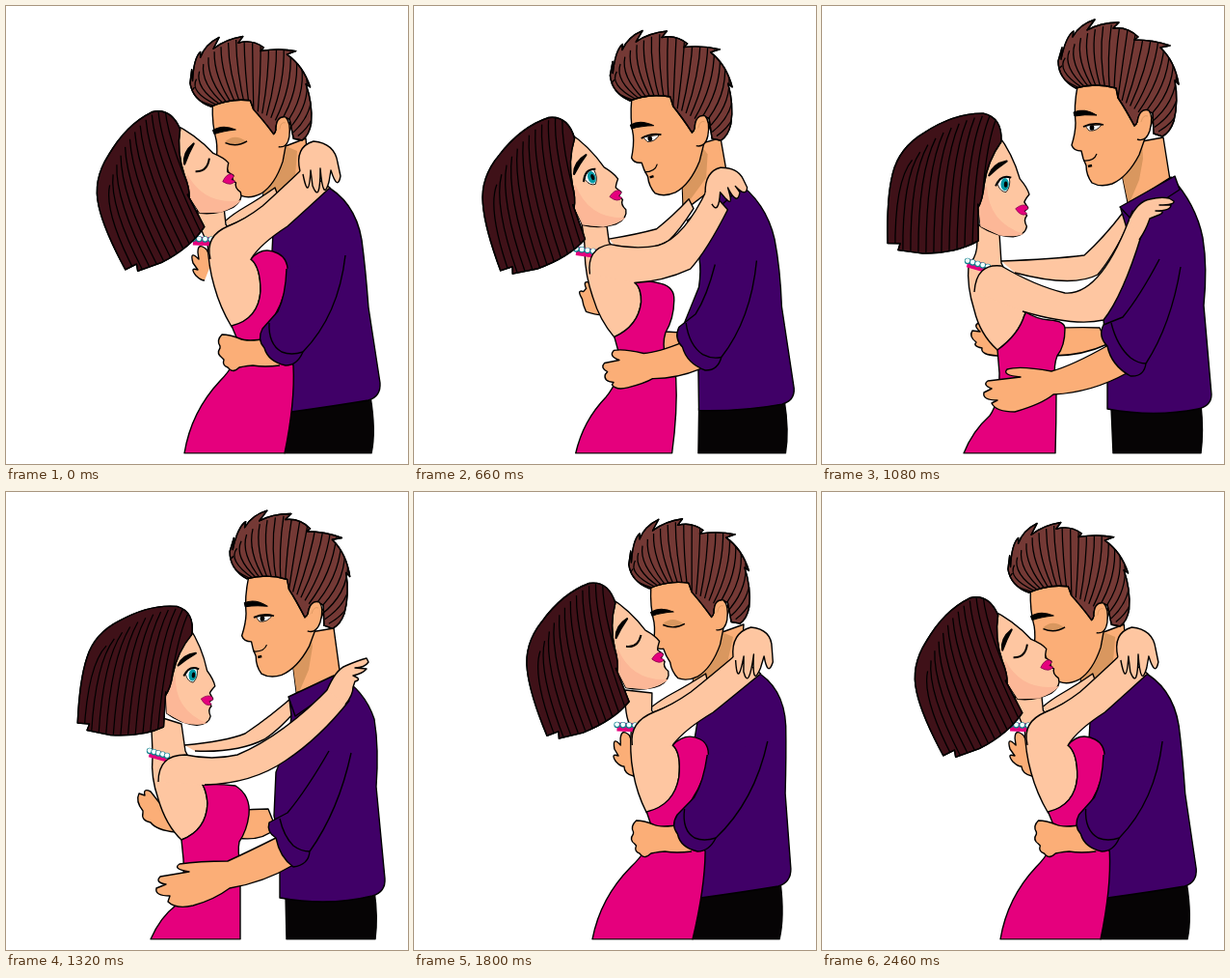
Animation, 417 px wide and 474 px high, one loop 2520 ms. Source, as an HTML page with a canvas:

```html
<!DOCTYPE html>
<html lang="en">
<head>
<meta charset="utf-8">
<title>Kissing couple</title>
<style>
html, body { margin: 0; width: 100%; height: 100%; overflow: hidden; background: #fff; }
canvas { display: block; }
</style>
</head>
<body>
<canvas id="stage" width="417" height="474"></canvas>
<script>
const ctx = document.getElementById('stage').getContext('2d');
const LOOP = 2520, STEP = 60;
const HER = '#fec6a1', HIS = '#fbae77', SHADE = '#d9975f', SHIRT = '#400067', DRESS = '#e5007d';
const HER_HAIR = '#3f1118', HIS_HAIR = '#743935';

// time, body form, bend, his head x y angle, her head x y angle scale
const keys = [
  [0, 0, 0, 288, 129, -9, 229, 161, -26, 0.99],
  [420, 0, -17, 269, 132, -9.5, 213, 165, -32, 0.99],
  [560, 0, -20, 266, 133, -10, 210, 166, -33, 0.99],
  [780, 1, 0, 339, 122, 0, 210, 191, 0, 1],
  [900, 1, 0, 336, 123, 0, 213, 192, 0, 1],
  [1080, 1, 0, 335, 122, 0, 214, 193, 1, 1],
  [1320, 2, 0, 321, 128, 1, 216, 199, 5, 0.95],
  [1620, 2.55, 14, 331, 120, -4, 236, 172, -9, 0.98],
  [1740, 3, 29, 321, 124, -8, 255, 152, -19, 0.98],
  [1800, 3, 27, 319, 126, -8, 253, 153, -20, 0.98],
  [2220, 3, 11, 300, 128, -9, 240, 158, -24, 0.99],
  [2460, 3, 2, 290, 129, -9, 231, 161, -26, 0.99],
  [2520, 3, 0, 288, 129, -9, 229, 161, -26, 0.99]
];

// Each body part: colour, then its outline while kissing, apart and reaching up
const parts = {
  rearHand: [HIS,
    'M214 264 L208 252 Q199 244 199 255 L200 262 Q190 252 194 266 L199 273 Q190 270 197 279 Q202 284 206 284 Q207 292 217 294 Z',
    'M184 340 L163 328 Q156 330 164 337 L156 336 Q152 342 160 348 Q156 352 166 354 Q164 361 182 362 Q183 362 184 362 Z',
    'M172 338 L150 310 Q142 306 144 314 L138 312 Q134 320 142 330 L142 332 Q140 340 150 342 Q156 350 176 352 Q176 352 177 352 Z'],
  rearForearm: [HIS,
    'M250 340 Q262 340 270 342 L276 356 Q266 360 252 358 Z',
    'M236 334 Q262 332 288 333 L296 350 Q270 362 240 362 Z',
    'M236 330 Q258 328 272 328 L280 348 Q265 362 240 358 Z'],
  trousers: ['#060405',
    'M293 416 L289 463 L379 463 Q384 440 378 404 Z',
    'M300 416 L302 463 L393 463 Q396 440 393 412 Z',
    'M290 418 L291 463 L383 463 Q386 440 382 412 Z'],
  neck: [HIS,
    'M268 190 L290 145 L311 137 L314 175 L262 216 Z',
    'M312 178 L332 140 L354 136 L361 180 L318 208 Z',
    'M298 182 L316 145 L340 141 L347 192 L302 214 Z'],
  neckShade: [SHADE,
    'M268 190 L290 145 L302 150 L300 176 L264 212 Z',
    'M312 178 L332 140 L333 158 L329 180 L318 206 Z',
    'M298 182 L316 145 L318 160 L314 184 L302 212 Z'],
  rearArm: [HER,
    'M228 222 Q236 215 248 208 Q262 200 279 188 L282 196 Q268 208 258 214 Q240 224 230 228',
    'M186 264 Q240 262 272 258 Q292 240 312 214 L318 226 Q300 262 286 278 Q260 292 200 276',
    'M185 262 Q228 258 248 250 Q275 232 303 207 L306 220 Q285 245 268 256 Q240 270 196 268'],
  shirt: [SHIRT,
    'M328 184 Q362 201 369 242 Q373 272 376 312 L388 390 Q389 404 376 408 Q340 414 296 420 L297 372 L276 332 L290 292 Q292 262 276 254 L277 234 Z',
    'M362 177 Q388 205 395 240 Q400 270 396 310 L404 402 Q404 414 390 417 Q345 426 296 417 L296 362 L292 325 L312 290 Q324 250 316 230 L310 210 Z',
    'M345 190 Q372 205 382 235 Q387 265 384 305 L393 400 Q394 414 380 418 Q335 429 284 420 L284 362 L278 335 L280 290 Q294 255 296 232 L294 215 Z'],
  collar: [SHIRT,
    'M276 234 L320 186 L326 190 L290 228 Z',
    'M309 208 L366 176 L371 190 L322 222 Z',
    'M293 212 L340 190 L352 196 L300 232 Z'],
  torso: [HER,
    'M198 205 Q200 232 209 244 Q210 270 216 290 Q222 312 234 332 Q262 324 264 295 Q264 270 254 262 L228 226 L226 208 Z',
    'M158 225 Q166 255 152 268 Q150 290 158 315 Q164 340 182 356 Q204 340 210 320 Q212 318 210 316 L186 266 L184 235 Z',
    'M150 230 Q152 262 152 274 Q150 295 158 318 Q166 345 182 360 Q208 350 209 322 Q208 310 204 303 L186 268 L182 240 Z'],
  dress: [DRESS,
    'M234 331 Q262 324 264 295 Q264 270 254 262 Q266 248 282 256 Q294 262 292 280 Q290 300 280 318 Q276 330 280 345 L298 372 Q300 410 289 463 L185 463 Q192 420 222 388 Q240 370 242 350 Z',
    'M182 356 Q204 340 210 320 Q212 318 210 316 Q222 324 236 325 Q252 326 252 334 Q252 352 244 362 Q240 372 242 385 L243 400 Q243 430 242 463 L147 463 Q156 440 174 424 Q184 410 184 380 Z',
    'M182 360 Q208 350 209 322 Q208 310 204 303 Q220 302 238 304 Q254 314 252 334 Q250 350 242 362 Q240 372 243 385 L243 400 Q243 430 243 463 L150 463 Q160 440 176 428 Q186 410 184 380 Z'],
  forearm: [HIS,
    'M272 344 Q250 348 242 344 Q232 340 224 340 Q218 346 222 352 L222 354 Q218 360 224 364 L226 366 Q224 372 230 374 L232 376 Q236 380 242 374 Q252 372 256 372 Q268 374 284 372',
    'M297 351 Q260 372 238 378 Q205 372 192 376 Q186 382 206 384 L172 388 Q166 392 176 396 L168 400 Q166 408 182 408 L176 411 Q180 420 200 420 Q228 412 240 402 Q280 400 316 380',
    'M280 358 Q252 372 230 382 Q200 382 180 385 Q172 390 190 393 L160 398 Q154 404 166 406 L156 410 Q154 418 170 418 L168 424 Q176 432 194 428 Q216 422 232 410 Q268 404 298 386'],
  sleeve: [SHIRT,
    'M291 272 Q290 300 282 316 L266 334 Q260 345 268 354 Q272 368 290 372 Q302 372 308 358 Q345 320 352 258',
    'M350 262 Q330 300 312 322 L292 330 Q286 342 296 352 Q300 372 320 383 Q334 384 336 370 Q362 330 372 270',
    'M335 268 Q312 308 292 332 L273 342 Q270 352 280 358 Q284 378 298 388 Q314 386 315 372 Q345 330 358 270'],
  cuff: [null,
    'M273 328 Q272 350 286 358 Q296 362 308 358',
    'M300 328 Q306 352 320 364 Q328 370 336 370',
    'M284 338 Q288 356 298 366 Q306 372 315 372'],
  arm: [HER,
    'M212 262 Q206 238 230 228 Q248 221 266 207 Q285 190 308 168 L336 188 Q310 212 292 228 Q264 246 254 262',
    'M158 296 Q160 266 186 269 Q222 290 252 297 Q290 300 322 212 L331 238 Q312 300 292 325 Q262 332 208 316',
    'M158 300 Q158 272 186 272 Q214 278 240 272 Q288 252 338 200 L356 216 Q325 255 290 278 Q255 302 206 303'],
  hand: [HER,
    'M305 171 Q299 146 319 140 Q341 142 344 162 L347 176 Q344 192 337 170 L335 182 Q329 204 326 168 Q326 206 318 186 L316 170 Q314 204 308 174',
    'M319 220 Q328 202 340 200 Q352 197 360 199 L365 202 Q366 206 350 206 L362 206 Q362 212 346 212 Q358 212 350 216 L340 220 Q336 232 329 242',
    'M333 205 Q342 184 352 180 Q366 174 374 172 L376 176 Q372 182 362 182 L374 183 Q370 188 360 190 Q370 194 362 196 L360 202 Q360 210 352 220']
};
const choker = ['M194 243 L219 244', 'M151 266 L172 272', 'M149 270 L167 275'];

const lerp = (a, b, u) => a + (b - a) * u;

function poseAt(t) {
  const i = keys.findIndex((k, n) => n && t < k[0]);
  const a = keys[i - 1], b = keys[i], u = (t - a[0]) / (b[0] - a[0]);
  return a.map((v, n) => lerp(v, b[n], u)).slice(1);
}

// Blends neighbouring forms and leans the body sideways from its feet up
function morph([kiss, apart, reach], form, bend) {
  const forms = [kiss, apart, reach, kiss], i = Math.min(2, Math.floor(form)), u = form - i;
  const target = forms[i + 1].match(/\d+/g);
  let n = 0;
  return forms[i].replace(/(\d+) (\d+)/g, (_, x, y) => {
    const px = lerp(+x, +target[n++], u), py = lerp(+y, +target[n++], u);
    return (px + bend * ((464 - py) / 300) ** 1.6).toFixed(1) + ' ' + py.toFixed(1);
  });
}

function shape(d, fill, line = 1.4, colour = '#000') {
  const p = new Path2D(d);
  if (fill) { ctx.fillStyle = fill; ctx.fill(p); }
  if (line) { ctx.lineWidth = line; ctx.strokeStyle = colour; ctx.stroke(p); }
}

function dot(x, y, rx, ry, fill) {
  ctx.beginPath();
  ctx.ellipse(x, y, rx, ry, 0, 0, 7);
  ctx.fillStyle = fill;
  ctx.fill();
}

function head(px, py, x, y, angle, scale, paint) {
  ctx.save();
  ctx.translate(x, y);
  ctx.rotate(angle * Math.PI / 180);
  ctx.scale(scale, scale);
  ctx.translate(-px, -py);
  paint();
  ctx.restore();
}

function hair(outline, fill, count, strand) {
  shape(outline, fill);
  ctx.save();
  ctx.clip(new Path2D(outline));
  for (let i = 0; i < count; i++) shape(strand(i), null, 1.3);
  ctx.restore();
  shape(outline, null);
}

function hisHead(kissing) {
  shape('M266 84 Q262 105 264 122 Q264 132 260 145 Q262 151 270 151 L272 159 L275 166 Q275 176 281 184 Q290 189 302 185 Q318 178 330 155 L336 138 L345 118 L306 82 Z', HIS);
  shape('M262 111 Q273 106 286 114 Q273 113 263 115 Z', '#000', 1);
  if (kissing) {
    shape('M273 125 Q284 117 295 128 Q284 132 273 126 Z', SHADE, 0);
    shape('M273 126 Q284 133 296 128', null, 1.5);
  } else {
    shape('M274 125 L291 124 Q286 131 278 130 Z', '#fff', 0.8);
    dot(281, 127, 2.4, 2.8, '#000');
    shape('M272 126 Q282 121 293 124', null, 1.8);
    shape('M272 161 Q283 162 286 154', null, 1.2);
    shape('M277 167 L281 166', null, 2.4);
  }
  hair('M264 86 Q246 76 246 58 L250 44 L249 56 Q254 32 262 27 L261 33 Q268 20 284 15 L276 26 Q290 18 309 18 L303 24 Q318 22 329 33 L325 36 Q345 36 362 42 L352 44 Q367 58 371 82 L367 78 Q371 100 366 120 Q362 132 354 136 L345 133 L344 112 Q330 104 328 122 L325 125 Q316 108 308 96 L306 86 Q285 80 264 86 Z',
    HIS_HAIR, 21, i => {
      const u = i / 20, bx = 266 + 84 * u, by = 85 + 46 * u * u;
      const a = Math.PI * (0.1 + 0.9 * u), ex = 309 - 62 * Math.cos(a), ey = 82 - 62 * Math.sin(a);
      return `M${bx} ${by} Q${lerp(bx, ex, 0.5) - 20 + 40 * u} ${lerp(by, ey, 0.6) + 12 * u} ${ex} ${ey}`;
    });
  shape('M328 122 Q330 106 340 109 Q345 115 341 130 Q337 142 328 139', HIS);
  shape('M332 121 Q334 113 339 115', null, 0.8, SHADE);
}

function herHead(kissing) {
  shape('M180 132 Q196 152 204 178 Q212 187 214 194 Q210 199 209 202 L213 208 L209 212 L212 216 Q208 220 212 227 Q211 236 198 238 Q180 238 164 228 L156 170 Z', HER);
  shape('M170 186 Q172 224 209 235 Q200 239 184 237 L164 228 L160 196 Z', '#fcb797', 0);
  shape('M200 209 Q207 203 212 206 L213 209 L209 211 L212 214 Q206 218 200 209 Z', DRESS, 0.7, '#7a0044');
  shape('M172 175 Q176 163 190 160 Q180 167 172 175 Z', '#000', 2.2);
  if (kissing) {
    shape('M179 187 Q190 193 198 181', null, 2);
  } else {
    shape('M181 184 Q185 174 193 177 Q195 186 190 192 Q184 192 181 184 Z', '#fff', 0.8);
    dot(188.5, 184, 4.2, 6.5, '#009aa5');
    dot(189.5, 184, 1.8, 3.2, '#000');
    shape('M179 186 Q184 173 195 177', null, 2);
  }
  hair('M161 205 L162 243 Q140 256 105 257 L79 254 L81 247 L68 247 Q66 200 72 175 Q78 148 104 132 Q135 111 165 111 Q185 115 184 140 Q170 160 167 185 Q166 200 161 209 Z',
    HER_HAIR, 12, i =>
      `M${180 - 8 * i} ${112 + 0.4 * i * i} Q${164 - 8.2 * i} ${150 + 3 * i} ${164 - 8 * i} 256`);
}

function necklace(form, bend) {
  const d = morph(choker, form, bend);
  shape(d, null, 9, DRESS);
  const [x1, y1, x2, y2] = d.match(/[\d.]+/g).map(Number);
  for (let i = 0; i < 5; i++) {
    const x = lerp(x1, x2, i / 4), y = lerp(y1, y2, i / 4) - 2;
    dot(x, y, 3.2, 3.2, '#127f8c');
    dot(x, y - 0.4, 2.4, 2.4, '#f2ffff');
  }
}

function draw(t) {
  const [form, bend, mx, my, ma, wx, wy, wa, ws] = poseAt(t);
  const kissing = form < 0.4 || form > 2.5;
  const body = (...names) => names.forEach(name => {
    const [fill, ...forms] = parts[name];
    shape(morph(forms, form, bend), fill, name === 'neckShade' ? 0 : 1.4);
  });
  ctx.fillStyle = '#fff';
  ctx.fillRect(0, 0, 417, 474);
  ctx.save();
  ctx.beginPath();
  ctx.rect(0, 0, 417, 463.5);
  ctx.clip();
  ctx.lineJoin = 'round';
  body('rearHand', 'rearForearm', 'trousers', 'neck', 'neckShade', 'rearArm', 'shirt', 'collar');
  head(336, 123, mx, my, ma, kissing ? 0.98 : 1, () => hisHead(kissing));
  body('torso', 'dress');
  necklace(form, bend);
  head(213, 192, wx, wy, wa, ws, () => herHead(kissing));
  body('forearm', 'sleeve', 'cuff', 'arm', 'hand');
  ctx.restore();
}

function tick() {
  draw(Math.floor(performance.now() % LOOP / STEP) * STEP);
  requestAnimationFrame(tick);
}
tick();
</script>
</body>
</html>
```
